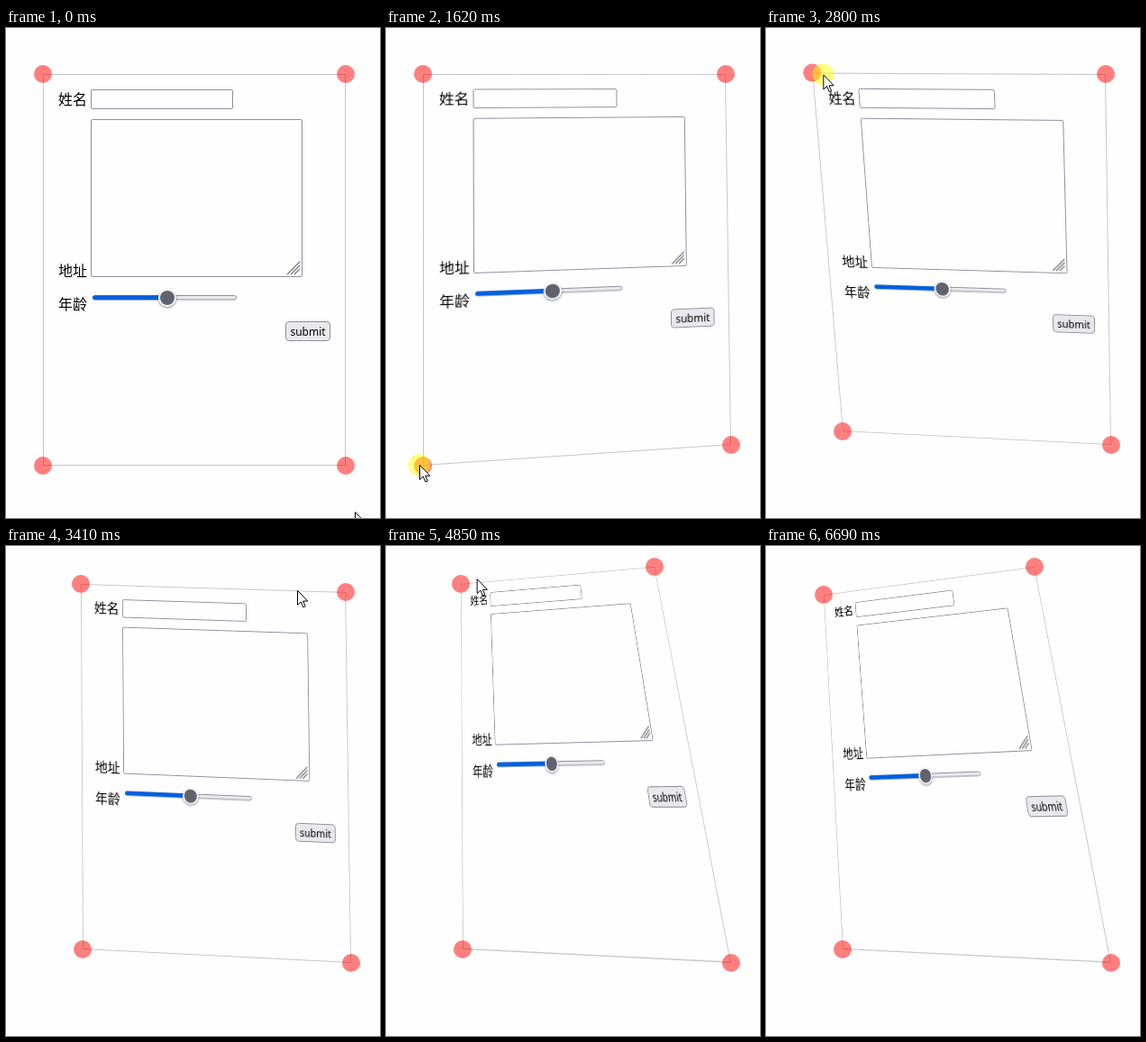
An HTML page for the animation above (7420 ms loop, 415 by 543 pixels).

```html
<!DOCTYPE html>
<html lang="zh">
<head>
<meta charset="utf-8">
<style>
  html, body { margin: 0; width: 100%; height: 100%; overflow: hidden; background: #fefefe; }
  svg { position: absolute; left: 0; top: 0; }
  #form { transform-origin: 0 0; font: 350 16px "Noto Sans CJK SC", "Noto Sans CJK", sans-serif; }
  .field { fill: #fefefe; stroke: #8f8f9d; }
  .grey { fill: #e9e9ed; stroke: #8f8f9d; }
  .thumb { fill: #fff; filter: drop-shadow(0 1px 1px rgba(0, 0, 0, .5)); }
  .submit { font: 12px "Noto Sans", "Open Sans", sans-serif; }
  #handles { fill: rgba(255, 0, 0, .5); }
</style>
</head>
<body>
<svg id="form" width="336" height="434" viewBox="41 51 336 434">
  <rect x="41.5" y="51.5" width="335" height="433" fill="none" stroke="#c6c6c6"/>
  <text x="58" y="85">姓名</text>
  <rect class="field" x="94.5" y="68.5" width="157" height="21" rx="1.5"/>
  <text x="58" y="275">地址</text>
  <rect class="field" x="94.5" y="101.5" width="234" height="174" rx="1.5"/>
  <path d="M312 273l14-14M316 273l10-10M320 273l6-6" stroke="#777" stroke-width="1.3"/>
  <text x="58" y="312">年龄</text>
  <rect class="grey" x="96.5" y="296.5" width="159" height="4.5" rx="2.2"/>
  <rect x="96" y="296.3" width="83" height="5" rx="2.5" fill="#0060df"/>
  <circle class="thumb" cx="179" cy="299" r="10"/>
  <circle cx="179" cy="299" r="8" fill="#62626e"/>
  <rect class="grey" x="310.5" y="325.5" width="49" height="21" rx="3.5"/>
  <text class="submit" x="335" y="341" text-anchor="middle">submit</text>
</svg>
<svg width="415" height="543">
  <g id="handles"><circle r="10"/><circle r="10"/><circle r="10"/><circle r="10"/></g>
  <g id="cursor">
    <path id="arrow" d="M.5.5V16.5L4.2 13L6.8 19L9.2 18L6.7 12.2H11.8Z" fill="#fff"/>
    <circle id="halo" r="12" fill="rgba(255, 255, 0, .5)"/>
    <use href="#arrow" fill="none" stroke="#000"/>
  </g>
</svg>
<script>
const LOOP = 7420, W = 336, H = 434;
const LEAD = 70;      // the handle trails the pointer by this long
const TRAVEL = 460;   // longest pointer trip between two presses
const ENTER = [387, 536], EXIT = [425, 535];
const REST = [[41, 51], [377, 51], [377, 485], [41, 485]];

// Corners count clockwise from the top left; grab is the pointer's offset from
// the handle; curve bends the vertical progress of the path.
const drags = [
  { corner: 2, press: 400, start: 480, ms: 330, release: 1020, to: [383, 462], grab: [2, 2], curve: 1 },
  { corner: 3, press: 1560, start: 1700, ms: 390, release: 2200, to: [85, 447], grab: [-4, -1], curve: .6 },
  { corner: 0, press: 2660, start: 2746, ms: 225, release: 3070, to: [83, 42], grab: [-1, 4], curve: .6 },
  { corner: 1, press: 3750, start: 3846, ms: 300, release: 4500, to: [298, 23], grab: [-6, 2], curve: 3 },
  { corner: 0, press: 5260, start: 5260, ms: 1, release: 5500, to: [83, 42], grab: [-14, 8], curve: 1 },
  { corner: 0, press: 5520, start: 5600, ms: 480, release: 6110, to: [64, 54], grab: [-2, 1], curve: 1 }
];

const $ = id => document.getElementById(id);
const form = $('form'), cursor = $('cursor'), halo = $('halo');
const handles = [...$('handles').children];

const clamp = v => Math.max(0, Math.min(1, v));
const mix = (a, b, px, py) => [a[0] + (b[0] - a[0]) * px, a[1] + (b[1] - a[1]) * py];

function cornerAt(i, t) {
  return drags.filter(d => d.corner === i).reduce((from, d) => {
    const p = clamp((t - d.start) / d.ms);
    return mix(from, d.to, p, 1 - (1 - p) ** d.curve);
  }, REST[i]);
}

function held(d, t) {
  const [x, y] = cornerAt(d.corner, t + LEAD);
  return [x + d.grab[0], y + d.grab[1]];
}

// Follows the held handle, otherwise sweeps from one press to the next.
function pointerAt(t) {
  const next = drags.find(d => d.release > t), prev = drags.findLast(d => d.release <= t);
  if (next && t >= next.press) return held(next, t);
  const start = prev ? prev.release : 0, end = next ? next.press : LOOP;
  const from = prev ? held(prev, start) : ENTER, to = next ? held(next, end) : EXIT;
  const p = clamp((t - start) / Math.min(TRAVEL, end - start));
  return mix(from, to, p * p * (3 - 2 * p), p ** 3);
}

// Projective map from the W x H rectangle to a quadrilateral.
function project([[x0, y0], [x1, y1], [x2, y2], [x3, y3]]) {
  const ax = x1 - x2, ay = y1 - y2, bx = x3 - x2, by = y3 - y2;
  const sx = x0 - x1 + x2 - x3, sy = y0 - y1 + y2 - y3;
  const den = ax * by - bx * ay;
  const g = (sx * by - bx * sy) / den, h = (ax * sy - sx * ay) / den;
  const m = [
    (x1 - x0 + g * x1) / W, (y1 - y0 + g * y1) / W, 0, g / W,
    (x3 - x0 + h * x3) / H, (y3 - y0 + h * y3) / H, 0, h / H,
    0, 0, 1, 0, x0, y0, 0, 1
  ];
  return `matrix3d(${m.map(v => v.toFixed(9))})`;
}

const place = (el, p) => el.setAttribute('transform', `translate(${p})`);

function draw(now) {
  const t = now % LOOP;
  const quad = REST.map((_, i) => cornerAt(i, t));
  form.style.transform = project(quad);
  handles.forEach((el, i) => place(el, quad[i]));
  place(cursor, pointerAt(t));
  halo.style.display = drags.some(d => t >= d.press && t < d.release) ? '' : 'none';
  requestAnimationFrame(draw);
}
draw(0);
</script>
</body>
</html>
```
